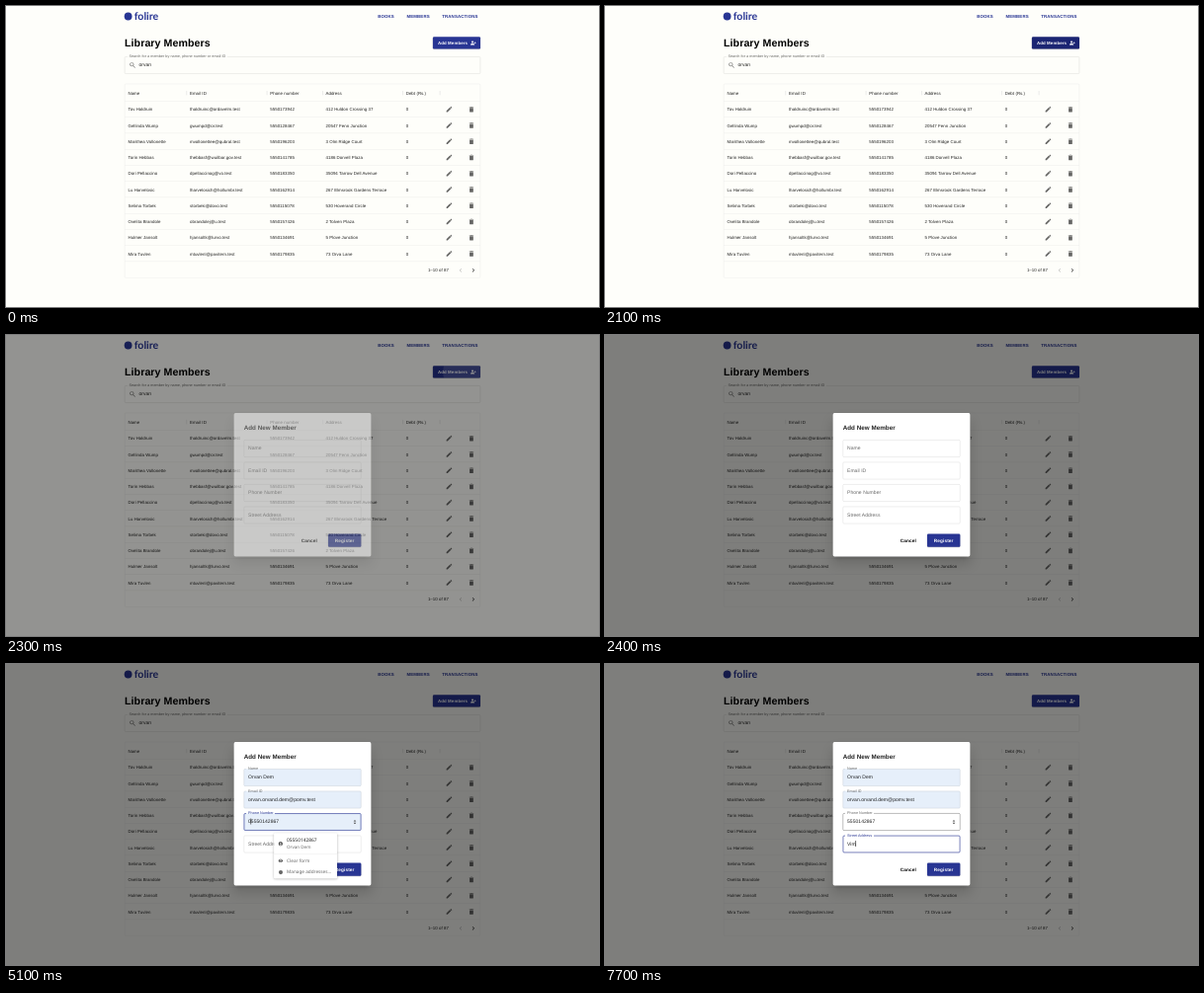
An HTML page that plays this animation: 600x305 px, repeating every 8 s.

```html
<!DOCTYPE html>
<html lang="en">
<head>
<meta charset="utf-8">
<title>Library Members</title>
<style>
html, body { margin: 0; width: 100%; height: 100%; overflow: hidden; background: #fefefa; }
#stage {
  --main: #283593; --line: #e0e0e0; --ink: rgba(0,0,0,.87);
  position: absolute; left: 0; top: 0; width: 1920px; height: 976px; overflow: hidden;
  transform: scale(.3125); transform-origin: 0 0; background: #fefefa; color: var(--ink);
  font-family: "Liberation Sans", Arial, sans-serif; text-rendering: geometricPrecision;
}
#stage div, #stage svg, #stage span.t { position: absolute; box-sizing: border-box; }
span.t { white-space: pre; line-height: 1; transform: translateY(-50%); }
.b { font-weight: 700; }
.mid { transform: translate(-50%, -50%) !important; }
.btn { background: var(--main); border-radius: 4px; overflow: hidden; }
.lift { box-shadow: 0 3px 1px -2px rgba(0,0,0,.2), 0 2px 2px rgba(0,0,0,.14), 0 1px 5px rgba(0,0,0,.12); border-radius: 4px; }
.field .bg { inset: 0; border-radius: 4px; }
.field fieldset {
  position: absolute; inset: -5px 0 0; margin: 0; padding: 0 8px; min-width: 0;
  border: 1px solid rgba(0,0,0,.23); border-radius: 4px; overflow: hidden;
}
.field legend { padding: 0; height: 11px; font-size: 12px; overflow: hidden; white-space: nowrap; letter-spacing: .00938em; }
.field legend span { padding: 0 5px; opacity: 0; }
.field .label {
  left: 0; top: 0; transform-origin: 0 0; white-space: nowrap;
  font-size: 16px; line-height: 23px; letter-spacing: .00938em;
}
.field .value { top: 16px; height: 23px; line-height: 23px; font-size: 16px; letter-spacing: .00938em; white-space: pre; }
.caret { display: inline-block; width: 2px; height: 19px; margin: 0 -1px; vertical-align: -4px; background: #111; }
.menu { background: #fff; border-radius: 3px; overflow: hidden; font-family: "Noto Sans", "Open Sans", sans-serif; }
.drop { border-radius: 3px; box-shadow: 0 2px 8px rgba(0,0,0,.35); }
</style>
</head>
<body>
<div id="stage"></div>
<script>
const LOOP = 8000, TICK = 100;
const stage = document.getElementById('stage');
const INK = 'rgba(0,0,0,.87)', SOFT = 'rgba(0,0,0,.6)', ICON = 'rgba(0,0,0,.6)', MAIN = '#283593';

const PATHS = {
  search: 'M15.5 14h-.79l-.28-.27C15.41 12.59 16 11.11 16 9.5 16 5.91 13.09 3 9.5 3S3 5.91 3 9.5 5.91 16 9.5 16c1.61 0 3.09-.59 4.23-1.57l.27.28v.79l5 4.99L20.49 19l-4.99-5zm-6 0C7.01 14 5 11.99 5 9.5S7.01 5 9.5 5 14 7.01 14 9.5 11.99 14 9.5 14z',
  edit: 'M3 17.25V21h3.75L17.81 9.94l-3.75-3.75L3 17.25zM20.71 7.04c.39-.39.39-1.02 0-1.41l-2.34-2.34c-.39-.39-1.02-.39-1.41 0l-1.83 1.83 3.75 3.75 1.83-1.83z',
  bin: 'M6 19c0 1.1.9 2 2 2h8c1.1 0 2-.9 2-2V7H6v12zM19 4h-3.5l-1-1h-5l-1 1H5v2h14V4z',
  prev: 'M15.41 7.41 14 6l-6 6 6 6 1.41-1.41L10.83 12z',
  next: 'M10 6 8.59 7.41 13.17 12l-4.58 4.59L10 18l6-6z',
  add: 'M13 8c0-2.21-1.79-4-4-4S5 5.79 5 8s1.79 4 4 4 4-1.79 4-4zm2 2v2h3v3h2v-3h3v-2h-3V7h-2v3h-3zM1 18v2h16v-2c0-2.66-5.33-4-8-4s-8 1.34-8 4z',
  person: 'M12 2C6.48 2 2 6.48 2 12s4.48 10 10 10 10-4.48 10-10S17.52 2 12 2zm0 3c1.66 0 3 1.34 3 3s-1.34 3-3 3-3-1.34-3-3 1.34-3 3-3zm0 14.2c-2.5 0-4.71-1.28-6-3.22.03-1.99 4-3.08 6-3.08 1.99 0 5.97 1.09 6 3.08-1.29 1.94-3.5 3.22-6 3.22z',
  eye: 'M12 4.5C7 4.5 2.73 7.61 1 12c1.73 4.39 6 7.5 11 7.5s9.27-3.11 11-7.5c-1.73-4.39-6-7.5-11-7.5zM12 17c-2.76 0-5-2.24-5-5s2.24-5 5-5 5 2.24 5 5-2.24 5-5 5z',
  spin: 'M12 2l6 7H6zM12 22l-6-7h12z'
};

function box(parent, x, y, w, h, css = '', cls = '') {
  const el = document.createElement('div');
  el.className = cls;
  el.style.cssText = `left:${x}px;top:${y}px;width:${w}px;height:${h}px;${css}`;
  return parent.appendChild(el);
}
// x is the left edge, y the middle of the line
function text(parent, x, y, size, str, css = '', cls = '') {
  const el = document.createElement('span');
  el.className = 't ' + cls;
  el.style.cssText = `left:${x}px;top:${y}px;font-size:${size}px;${css}`;
  el.textContent = str;
  return parent.appendChild(el);
}
function icon(parent, name, cx, cy, size = 24, color = ICON) {
  parent.insertAdjacentHTML('beforeend',
    `<svg viewBox="0 0 24 24" width="${size}" height="${size}" style="left:${cx - size / 2}px;top:${cy - size / 2}px" fill="${color}"><path d="${PATHS[name]}"/></svg>`);
  return parent.lastElementChild;
}
const dot = (parent, cx, cy, d, color) =>
  box(parent, cx - d / 2, cy - d / 2, d, d, `border-radius:50%;background:${color}`);

function field(parent, x, y, w, name, inset = 14) {
  const el = box(parent, x, y, w, 56, '', 'field');
  el.innerHTML = `<div class="bg"></div><fieldset><legend><span>${name}</span></legend></fieldset>` +
    `<div class="label">${name}</div><div class="value" style="left:${inset}px"></div>`;
  const q = s => el.querySelector(s);
  const bg = q('.bg'), frame = q('fieldset'), legend = q('legend'), label = q('.label'), value = q('.value');
  let last;
  return ({ shrink = 0, focus = false, hover = false, filled = false, preview = false, str = '', caret = -1 }) => {
    const key = [shrink, focus, hover, filled, preview, str, caret].join();
    if (key === last) return;
    last = key;
    bg.style.background = filled ? '#e6effa' : 'none';
    frame.style.borderWidth = focus ? '2px' : '1px';
    frame.style.padding = focus ? '0 7px' : '0 8px';
    frame.style.borderColor = focus ? MAIN : hover ? INK : 'rgba(0,0,0,.23)';
    legend.style.maxWidth = shrink > .3 ? '100%' : '.01px';
    label.style.transform = `translate(14px,${16 - 25 * shrink}px) scale(${1 - .25 * shrink})`;
    label.style.color = focus ? MAIN : SOFT;
    value.style.fontSize = preview ? '13.33px' : '16px';
    value.textContent = caret < 0 ? str : str.slice(0, caret);
    if (caret >= 0) {
      value.insertAdjacentHTML('beforeend', '<i class="caret"></i>');
      value.append(str.slice(caret));
    }
  };
}

// Header
dot(stage, 395, 33, 25, MAIN);
text(stage, 415, 32, 34, 'folire', `color:${MAIN};font-family:Lato,sans-serif`, 'b');
[[1204, 'BOOKS'], [1297.5, 'MEMBERS'], [1412, 'TRANSACTIONS']].forEach(([x, s]) =>
  text(stage, x, 34, 14, s, `color:${MAIN};letter-spacing:.02857em`, 'b'));
text(stage, 384, 119, 34, 'Library Members', 'letter-spacing:.00735em;color:#000', 'b');

const addBtn = box(box(stage, 1382, 100, 154, 39, '', 'lift'), 0, 0, 154, 39, '', 'btn');
const ripple = dot(addBtn, 112, 20, 260, '#fff');
text(addBtn, 16, 20, 14, 'Add Members', 'color:#fff;letter-spacing:.02857em', 'b');
icon(addBtn, 'add', 131, 19.5, 20, '#fff');

const search = field(stage, 384, 164, 1152, 'Search for a member by name, phone number or email ID', 46);
icon(stage, 'search', 410, 192);

// Table
const COLS = [395, 595, 855, 1035, 1295];
const ROWS = [
  ['Tov Haldruin', 'thaldruinc@ordavelm.test', '5550173942', '412 Huldon Crossing 37'],
  ['Gellinda Wump', 'gwumpd@or.test', '5550128467', '20547 Fenn Junction'],
  ['Marithea Vollonette', 'mvollonettee@qubral.test', '5550196203', '3 Olm Ridge Court'],
  ['Torin Hebbas', 'thebbasf@wuilbar.gov.test', '5550141785', '4186 Dorvell Plaza'],
  ['Dori Pellaccino', 'dpellaccinog@vo.test', '5550183350', '35094 Tarrow Dell Avenue'],
  ['Lu Harvelosic', 'lharvelosich@hollumbr.test', '5550162914', '267 Elmsrook Gardens Terrace'],
  ['Selima Torbek', 'storbeki@dovo.test', '5550115078', '530 Hoverand Circle'],
  ['Ovelita Brandole', 'obrandolej@u.test', '5550157426', '2 Tolven Plaza'],
  ['Hulmer Jansolt', 'hjansoltk@lurvo.test', '5550134691', '5 Plove Junction'],
  ['Mira Tuvlen', 'mtuvlenl@pavitern.test', '5550179835', '73 Orva Lane']
];
const CELL = 'letter-spacing:.01071em';
box(stage, 384, 252, 1152, 630, 'border:1px solid var(--line);border-radius:4px');
['Name', 'Email ID', 'Phone number', 'Address', 'Debt (Rs.)'].forEach((s, i) =>
  text(stage, COLS[i], 282, 14, s, CELL));
[585, 845, 1025, 1285, 1405].forEach(x => box(stage, x - 1, 275, 2, 14, 'background:var(--line)'));
ROWS.forEach((row, r) => {
  const y = 335 + 52 * r;
  box(stage, 385, y - 27, 1150, 1, 'background:var(--line)');
  [...row, '0'].forEach((s, i) => text(stage, COLS[i], y, 14, s, CELL));
  icon(stage, 'edit', 1435, y);
  icon(stage, 'bin', 1507, y);
});
box(stage, 385, 828, 1150, 1, 'background:var(--line)');
text(stage, 1366, 857, 14, '1–10 of 87', CELL);
icon(stage, 'prev', 1472, 857, 24, 'rgba(0,0,0,.26)');
icon(stage, 'next', 1513, 857, 24, 'rgba(0,0,0,.8)');

// Dialog
const shade = box(stage, 0, 0, 1920, 976, 'background:#000');
const dialog = box(stage, 0, 0, 1920, 976);
box(dialog, 738, 253, 444, 465, 'background:#fff;border-radius:5px;box-shadow:0 11px 15px -7px rgba(0,0,0,.2),0 24px 38px 3px rgba(0,0,0,.14)');
text(dialog, 770, 301, 20, 'Add New Member', 'letter-spacing:.0075em', 'b');
const [nameBox, mailBox, phoneBox, streetBox] =
  ['Name', 'Email ID', 'Phone Number', 'Street Address'].map((s, i) => field(dialog, 770, 340 + 72 * i, 380, s));
const spinner = icon(dialog, 'spin', 1129, 512, 17, '#444');
text(dialog, 982, 666, 15, 'Cancel', 'letter-spacing:.02857em;color:#000', 'b mid');
box(dialog, 1043, 645, 107, 42, '', 'btn lift');
text(dialog, 1096.5, 666, 15, 'Register', 'color:#fff;letter-spacing:.02857em', 'b mid');

// Suggestion menus
const PERSON = 'Orvan Dem', MAIL = 'orvan.orvand.dem@pomv.test', PHONE = '05550142867';
const GREY = 'color:#666', LEFT = 41;
function menu(y, w, h) {
  const wrap = box(dialog, 868, y, w, h, '', 'drop');
  return [wrap, box(wrap, 0, 0, w, h, '', 'menu')];
}
const [pickWrap, pick] = menu(410, 253, 166);
box(pick, 0, 0, 253, 58, 'background:#e2e2e0');
[[PERSON, 16, 'color:#222'], ['Dem Varik', 75, GREY]].forEach(([s, y, css]) => {
  icon(pick, 'person', 21, y + 12, 16, '#444');
  text(pick, LEFT, y, 15, s);
  text(pick, LEFT, y + 23, 15, MAIL.slice(0, 22) + '…', css);
});
box(pick, 0, 117, 253, 1, 'background:#ddd');
dot(pick, 21, 143, 13, '#666');
text(pick, LEFT, 143, 15, 'Manage addresses...', GREY);

const [tipWrap, tip] = menu(549, 204, 146);
icon(tip, 'person', 21, 34, 16, '#444');
text(tip, LEFT, 22, 15.5, PHONE);
text(tip, LEFT, 45, 14.5, PERSON, GREY);
box(tip, 0, 67, 204, 1, 'background:#ddd');
icon(tip, 'eye', 21, 89, 16, '#444');
dot(tip, 21, 89, 4, '#444');
text(tip, LEFT, 89, 15, 'Clear form', GREY);
dot(tip, 21, 126, 13, '#666');
text(tip, LEFT, 126, 15, 'Manage addresses...', GREY);

// Motion
function ramp(t, a, b) {
  const p = Math.min(1, Math.max(0, (t - a) / (b - a)));
  return p * p * (3 - 2 * p);
}
const within = (t, a, b) => t >= a && t < b;
// last value whose start time has been reached
const at = (t, steps) => steps.reduce((v, [start, next]) => t >= start ? next : v, null);
const show = (el, on) => { el.style.visibility = on ? 'visible' : 'hidden'; };

function draw(t) {
  search({ shrink: 1, str: 'orvan', hover: within(t, 800, 1200) });

  const dark = ramp(t, 1900, 2150) - ramp(t, 2150, 2400);
  addBtn.style.background = `rgb(${40 - 14 * dark},${53 - 18 * dark},${147 - 36 * dark})`;
  ripple.style.transform = `scale(${ramp(t, 2100, 2450)})`;
  ripple.style.opacity = .25 * (ramp(t, 2100, 2180) - ramp(t, 2220, 2400));

  shade.style.opacity = .5 * ramp(t, 2130, 2355);
  const open = ramp(t, 2200, 2400);
  dialog.style.opacity = open;
  dialog.style.display = open ? 'block' : 'none';

  const filled = t >= 3500, preview = filled && t < 3900;
  const rise = ramp(t, 3500, 3700);
  nameBox({
    shrink: ramp(t, 2800, 3000), focus: within(t, 2800, 4300), filled, preview,
    str: filled ? PERSON : '', caret: at(t, [[0, -1], [2900, 0], [3500, -1]])
  });
  mailBox({ shrink: rise, filled, preview, str: filled ? MAIL : '' });
  phoneBox({
    shrink: rise, focus: within(t, 4300, 6100), hover: t >= 4300,
    filled: filled && t < 5700, preview,
    str: at(t, [[0, ''], [3500, PHONE], [5700, PHONE.slice(1)]]),
    caret: at(t, [[0, -1], [4300, PHONE.length], [4900, 0], [5100, 1], [5700, 0], [6100, -1]])
  });
  streetBox({
    shrink: ramp(t, 6100, 6300), focus: t >= 6100,
    str: at(t, [[0, ''], [7400, 'V'], [7700, 'Vim']]),
    caret: at(t, [[0, -1], [6200, 0], [6700, -1], [7400, 1], [7700, 3]])
  });
  show(spinner, t >= 4300);
  show(pickWrap, within(t, 3300, 3900));
  show(tipWrap, within(t, 4400, 5700));
}

function loop() {
  const t = performance.now() % LOOP;
  draw(Math.floor(t / TICK) * TICK);
  requestAnimationFrame(loop);
}
loop();
</script>
</body>
</html>
```
